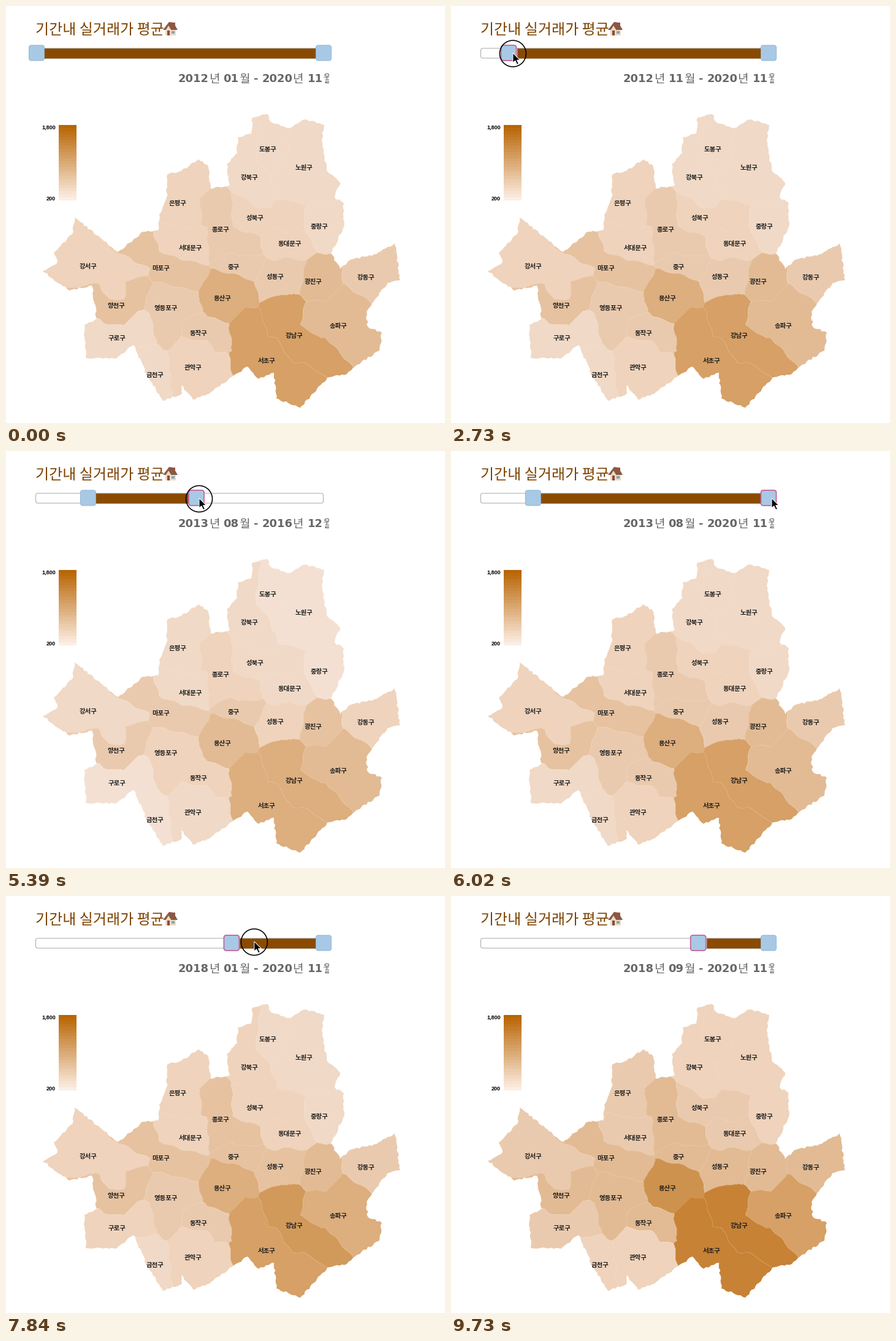
Animation, 716 px wide and 680 px high, one loop 9.8 s. Source, as a matplotlib script:

```python
import random
import numpy as np
import matplotlib.pyplot as plt
from matplotlib.animation import FuncAnimation
from matplotlib.colors import to_rgb
from matplotlib.patches import Circle, FancyBboxPatch, Polygon, Rectangle
from matplotlib.transforms import Affine2D

W, H, STEP, LOOP = 716, 680, 70, 9800
PX = 0.72  # points per pixel at 100 dpi
KR = "Noto Sans CJK JP"

fig = plt.figure(figsize=(W / 100, H / 100), dpi=100, facecolor="white")
ax = fig.add_axes([0, 0, 1, 1])
ax.axis("off")

# ---- key corners of the city outline, clockwise; the jags are random ----
SHORE = [
    (365, 292), (360, 258), (377, 240), (378, 214), (400, 208), (402, 182), (426, 176),
    (432, 189), (462, 199), (487, 185), (519, 194), (515, 220), (523, 268), (545, 288),
    (536, 312), (551, 322), (551, 360), (530, 403), (545, 429), (564, 413), (605, 404),
    (634, 387), (643, 447), (622, 452), (588, 499), (590, 523), (613, 533), (609, 562),
    (580, 580), (556, 600), (524, 606), (480, 655), (441, 640), (437, 598), (412, 608),
    (394, 588), (372, 602), (332, 632), (305, 642), (286, 618), (287, 632), (256, 644),
    (229, 600), (208, 553), (196, 562), (180, 575), (130, 574), (128, 520), (148, 510),
    (140, 456), (103, 464), (60, 432), (84, 418), (78, 402), (108, 372), (112, 345),
    (183, 401), (224, 368), (248, 366), (250, 340), (262, 312), (263, 275), (287, 268),
    (314, 250), (330, 262), (334, 298)]

# Each district owns the ground nearest to its seeds.
# name, label spot, price level over all years, level in the last years, seeds
DISTRICTS = [
    ("도봉구", (427, 233), 1, 2, [(430, 230)]),
    ("노원구", (486, 263), 1, 2, [(488, 235), (470, 285), (508, 285)]),
    ("강북구", (397, 279), 1.45, 2, [(388, 225), (388, 275), (405, 310)]),
    ("성북구", (406, 345), 2, 3, [(392, 330), (405, 350), (455, 350)]),
    ("중랑구", (511, 359), 1, 2, [(515, 357)]),
    ("동대문구", (463, 387), 2, 3, [(440, 383), (466, 382)]),
    ("은평구", (280, 321), 2, 3, [(290, 335), (300, 285)]),
    ("서대문구", (301, 394), 2, 3, [(280, 385), (312, 393)]),
    ("종로구", (350, 364), 3.42, 5, [(345, 330), (347, 390), (392, 390)]),
    ("중구", (371, 425), 3.45, 5, [(365, 424), (395, 424)]),
    ("용산구", (353, 476), 6, 9, [(338, 470), (360, 446), (378, 460), (358, 497)]),
    ("성동구", (439, 441), 3.42, 5, [(434, 444), (458, 440)]),
    ("광진구", (501, 449), 5, 5, [(510, 449)]),
    ("강동구", (587, 442), 3, 5, [(587, 442)]),
    ("송파구", (542, 521), 5.45, 7, [(511, 512), (555, 492), (554, 534)]),
    ("강남구", (470, 537), 7.42, 10, [(455, 500), (485, 552), (512, 572)]),
    ("서초구", (425, 578), 7, 10, [(383, 525), (395, 590), (430, 585), (487, 608)]),
    ("동작구", (314, 533), 3, 5, [(346, 530), (312, 530)]),
    ("관악구", (305, 589), 2, 2, [(308, 558), (340, 598), (290, 590)]),
    ("금천구", (243, 601), 1, 2, [(225, 580), (243, 595)]),
    ("영등포구", (261, 492), 3, 5, [(292, 482), (252, 475), (262, 521)]),
    ("구로구", (181, 541), 1.42, 3, [(145, 542), (175, 540), (218, 530)]),
    ("양천구", (180, 488), 4, 5, [(143, 478), (180, 498), (212, 462)]),
    ("강서구", (134, 424), 2, 3, [(135, 430), (178, 458), (205, 428)]),
    ("마포구", (253, 427), 4, 5, [(217, 405), (262, 430), (301, 441)]),
]
SHADES = np.array([to_rgb(c) for c in (
    "#f4e0d2", "#f0d9c6", "#efd3bc", "#eacaae", "#e6c2a0", "#e2bb94",
    "#ddae7e", "#d6a066", "#d19a5a", "#cd924e", "#c78236")])


def roughen(points, rng):
    """Cut each side into short steps and nudge the new corners."""
    points, out = np.array(points, float), []
    for a, b in zip(points, np.roll(points, -1, axis=0)):
        d = b - a
        side = np.array([-d[1], d[0]]) / np.hypot(*d)
        n = max(1, int(np.hypot(*d) // 4))
        for k in range(n):
            out.append(a + d * k / n + side * (rng.uniform(-1.5, 1.5) if k else 0))
    return out


def nearest_district():
    y, x = np.mgrid[0:H, 0:W] + 0.5
    u = x + 1.3 * np.sin(y / 5 + x / 17)
    v = y + 1.3 * np.sin(x / 6 + y / 13)
    return np.argmin([np.min([(u - a) ** 2 + (v - b) ** 2 for a, b in row[-1]], axis=0)
                      for row in DISTRICTS], axis=0)


cell = nearest_district()
seam = (cell != np.roll(cell, 1, 0)) | (cell != np.roll(cell, 1, 1))
level_all, level_new = (np.array([row[k] for row in DISTRICTS]) for k in (2, 3))


def paint(shift):
    """Map picture for prices moved by some levels; None means the last years."""
    level = level_new if shift is None else np.rint(level_all + shift).astype(int)
    picture = SHADES[level][cell]
    picture[seam] += 0.2 * (np.array([1, 0.93, 0.85]) - picture[seam])
    return picture


city = ax.imshow(paint(0), extent=(0, W, H, 0), interpolation="nearest", aspect="auto")
ax.set_xlim(0, W)
ax.set_ylim(H, 0)
land = ax.add_patch(Polygon(roughen(SHORE, random.Random(4)), fc="none", ec="none"))
city.set_clip_path(land)
for name, (x, y), *_ in DISTRICTS:
    ax.text(x, y + 4, name, family=KR, weight="bold", size=10.4 * PX,
            color="#1c1c1c", ha="center", va="baseline")

# ---- legend ----
TOP, BOTTOM, BANDS = 194, 316.5, 25
dark, pale = np.array(to_rgb("#b86504")), np.array(to_rgb("#fceee4"))
for k in range(BANDS):
    h = (BOTTOM - TOP) / BANDS
    ax.add_patch(Rectangle((86, TOP + k * h), 29, h + 0.3, lw=0,
                           fc=dark + (pale - dark) * k / (BANDS - 1)))
for y, label in ((201, "1,800"), (317, "200")):
    ax.text(81, y, label, family="Liberation Sans", weight="bold", size=9 * PX,
            ha="right", va="baseline")

# ---- title and house ----
ax.text(48, 46.5, "기간내 실거래가 평균", family=KR, size=24 * PX, color="#7d4200",
        va="baseline")


def block(x, y, w, h, color):
    ax.add_patch(Rectangle((x, y), w, h, fc=color, lw=0))


block(272, 27, 4, 10, "#a5523f")
block(260, 36, 17, 12, "#ecd8c2")
ax.add_patch(Polygon([(256, 39), (266, 26), (273, 27), (280, 39)], fc="#8a5845", lw=0))
ax.add_patch(Polygon([(260, 40), (265, 32), (270, 40)], fc="#ecd8c2", lw=0))
block(263, 40, 4, 8, "#8c4a35")
block(270, 41, 5, 4, "#7fa6bd")

# ---- slider ----
MONTHS, X0, X1 = 106, 50, 518


def box(x, y, w, h, r, **kw):
    style = f"round,pad=0,rounding_size={r}"
    return ax.add_patch(FancyBboxPatch((x, y), w, h, boxstyle=style, **kw))


box(48.5, 69, 469, 16, 3.5, fc="white", ec="#a8a8a8", lw=PX)
fill = ax.add_patch(Rectangle((X0, 69), 1, 16, fc="#8a4b00", ec="#8f6a45", lw=0.8 * PX))
knobs = [box(0, 64, 25, 25, 4, fc="#a8c9e5") for _ in range(2)]

# ---- period text, cut off at the right like its box ----
runs = [ax.text(0, 0, "", color="#666666", va="baseline", clip_on=True) for _ in range(9)]
for run in runs:
    run.set_clip_path(Rectangle((270, 100), 257, 35, transform=ax.transData))


def write_period(left, right):
    words = [f"{2012 + left // 12}", "년", f"{left % 12 + 1:02d}", "월", "-",
             f"{2012 + right // 12}", "년", f"{right % 12 + 1}", "월"]
    x = 280.5
    for run, word in zip(runs, words):
        hangul = word in "년월"
        run.set(text=word, x=x, y=124.5, family=KR if hangul else "DejaVu Sans",
                weight="normal" if hangul else "bold", size=(19 if hangul else 18) * PX)
        x += 17.8 if hangul else 7.5 if word == "-" else 12.53 * len(word)
        x += 6.2 if word in "월년-" else 0


# ---- pointers, drawn around their hot spot ----
def part(shape, color, edge="none", width=0.0):
    return ax.add_patch(Polygon(shape, fc=color, ec=edge, lw=width * PX, zorder=6))


arrow = [part([(0, 0), (0, 16), (3.8, 12.6), (6.8, 18.8), (9.4, 17.6), (6.6, 11.6),
               (11.6, 11.6)], "black", "white", 1)]
lean = Affine2D().rotate_deg(-24).transform
tree = [part(lean([(-3, 34), (3, 34), (3, 42), (-3, 42)]), "#d86f78", "#f3d0cf", 1)]
for k in (2, 1, 0):
    y, half = 3 + 8 * k, 9 + 3 * k
    tree.append(part(lean([(0, y), (half, y + 17), (0, y + 20), (-half, y + 17)]),
                     ("#a6ec3f", "#92e52b", "#7bd822")[k], "#e6f6c4", 1.2))
turn = np.arange(10) * np.pi / 5
spike = np.where(np.arange(10) % 2, 2, 5)
tree.append(part(np.c_[spike * np.sin(turn), 2 - spike * np.cos(turn)], "#f3e27a"))
ring = ax.add_patch(Circle((0, 0), 21.5, fc="none", ec="black", lw=1.6 * PX, zorder=5))

# pointer glides: start, end, where to
START = (520, 40)
GLIDES = [(70, 280, (345, 430)), (490, 560, (135, 632)), (770, 1190, (516, 76)),
          (1330, 1610, (73, 80)), (1610, 1750, (50, 76)), (2170, 3150, (134, 77)),
          (3360, 3500, (330, 379)), (3500, 3612, (518, 76)), (3612, 4130, (310, 76)),
          (4830, 4900, (315, 77)), (5390, 5880, (523, 77)), (6440, 7000, (147, 78)),
          (7280, 7910, (414, 74)), (8750, 9310, (670, 700))]
# knob drags: press, release, knob, grip offset
DRAGS = [(2170, 3220, 0, 0), (3640, 4340, 1, 0), (5250, 6020, 1, 5), (7140, 8050, 0, 12)]
# looks from a given time on
MODES = [(0, "none"), (70, "tree"), (1260, "press"), (1330, "tree"), (1750, "arrow"),
         (1820, "press"), (3220, "arrow"), (3430, "tree"), (3570, "arrow"),
         (3710, "press"), (4340, "arrow"), (5250, "press"), (6020, "arrow"),
         (7140, "press"), (8050, "arrow"), (8750, "tree"), (9310, "none")]
FOCUS = [(0, None), (1260, 1), (1820, 0), (3710, 1), (7140, 0)]
PRICES = [(0, 0), (3010, 0.1), (4410, -0.94), (5740, -0.4), (6160, 0.1), (8120, None)]


def latest(track, t):
    return [v for start, v in track if start <= t][-1]


def pointer_at(t):
    spot = np.array(START, float)
    for a, b, goal in GLIDES:
        s = np.clip((t - a) / (b - a), 0, 1)
        spot += (np.array(goal) - spot) * s * s * (3 - 2 * s)
    return spot


def months_at(t):
    """Knobs trail the pointer by one step and snap to months."""
    months = [0, MONTHS]
    for press, release, knob, grip in DRAGS:
        if press <= t:
            x = pointer_at(np.clip(t - STEP, press, release))[0] - grip
            months[knob] = int(np.clip(round((x - X0) / (X1 - X0) * MONTHS), 0, MONTHS))
    return months


def draw(i):
    t = i * STEP
    months = months_at(t)
    xs = [X0 + (X1 - X0) * m / MONTHS for m in months]
    x, y = pointer_at(t)
    mode, focus = latest(MODES, t), latest(FOCUS, t)

    # a focused knob keeps a thin gap to the bar
    ends = xs[0] + 13.5 * (focus == 0), xs[1] - 13.5 * (focus == 1)
    fill.set(x=ends[0], width=ends[1] - ends[0])
    for k, knob in enumerate(knobs):
        hover = mode in ("arrow", "press") and abs(x - xs[k]) < 15
        edge = "#c4659d" if focus == k else "#8796a8" if hover else "#92b5d3"
        knob.set(x=xs[k] - 12.5, edgecolor=edge, linewidth=(1.8 if focus == k else 1) * PX)
    write_period(*months)
    city.set_data(paint(latest(PRICES, t)))

    move = Affine2D().translate(x, y) + ax.transData
    for shapes, shown in ((arrow, mode in ("arrow", "press")), (tree, mode == "tree")):
        for shape in shapes:
            shape.set_transform(move)
            shape.set_visible(shown)
    ring.set_visible(mode == "press")
    ring.center = x, y + 1
    return []


anim = FuncAnimation(fig, draw, frames=LOOP // STEP, interval=STEP, repeat=True,
                     repeat_delay=0, init_func=lambda: draw(0))
plt.show()
```
